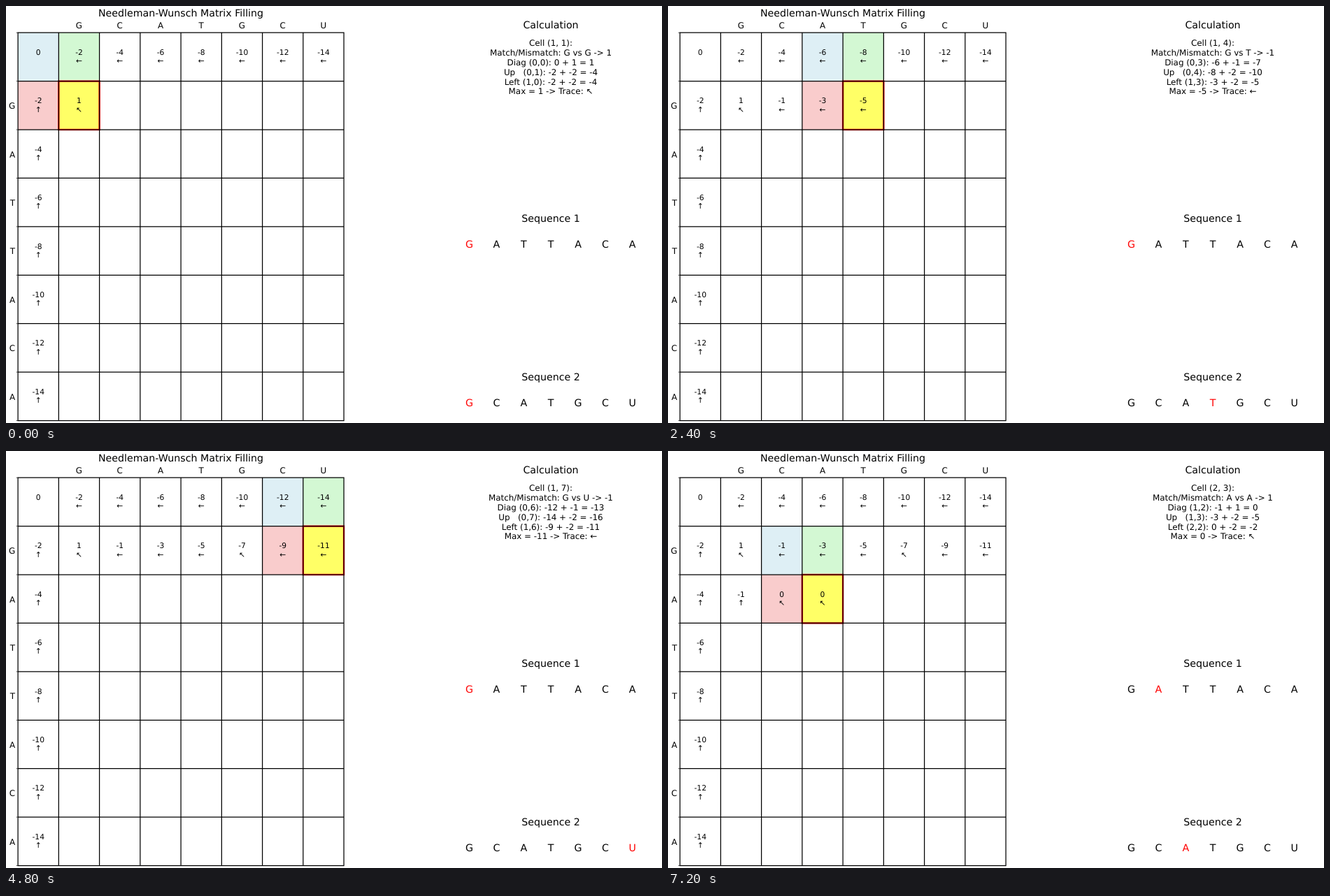
These frames come from a looping animation (938x597 px, 8 s). An HTML page:

```html
<!DOCTYPE html>
<html lang="en">
<head>
<meta charset="utf-8">
<title>Needleman-Wunsch Matrix Filling</title>
<style>
  html, body { margin: 0; width: 100%; height: 100%; overflow: hidden; background: #fff; }
  svg { display: block; }
  text {
    font-family: "DejaVu Sans", sans-serif;
    text-anchor: middle;
    text-rendering: geometricPrecision;
    white-space: pre;
  }
</style>
</head>
<body>
<svg id="stage" width="938" height="597" viewBox="0 0 938 597"></svg>
<script>
const STEP = 800, STEPS = 10;
const ROWS = "GATTACA", COLS = "GCATGCU", GAP = -2;
const X0 = 17.1, Y0 = 38.2, W = 58.25, H = 69.42, N = 8;
const BIG = 14.2, MID = 11.9, SMALL = 10.7;
const SIDE = 779;
const stage = document.getElementById("stage");

function add(tag, attrs, text) {
  const el = document.createElementNS("http://www.w3.org/2000/svg", tag);
  for (const k in attrs) el.setAttribute(k, attrs[k]);
  if (text !== undefined) el.textContent = text;
  return stage.appendChild(el);
}
const label = (x, y, size, text = "") => add("text", { x, y, "font-size": size }, text);
const colX = c => X0 + c * W;
const rowY = r => Y0 + r * H;
const tile = attrs => add("rect", { width: W, height: H, ...attrs });
function place(el, r, c) {
  el.setAttribute("x", colX(c));
  el.setAttribute("y", rowY(r));
}

// Score table
const score = [], trace = [];
function solve(r, c) {
  const match = ROWS[r - 1] === COLS[c - 1] ? 1 : -1;
  const diag = score[r - 1][c - 1] + match;
  const up = score[r - 1][c] + GAP;
  const left = score[r][c - 1] + GAP;
  const max = Math.max(diag, up, left);
  return { match, diag, up, left, max, arrow: max === diag ? "↖" : max === up ? "↑" : "←" };
}
for (let r = 0; r < N; r++) {
  score[r] = [];
  trace[r] = [];
  for (let c = 0; c < N; c++) {
    if (r && c) {
      const s = solve(r, c);
      score[r][c] = s.max;
      trace[r][c] = s.arrow;
    } else {
      score[r][c] = (r + c) * GAP;
      trace[r][c] = r ? "↑" : c ? "←" : "";
    }
  }
}

// Highlights lie under the grid
const diagTile = tile({ fill: "#deeff5" });
const upTile = tile({ fill: "#d3f8d3" });
const leftTile = tile({ fill: "#f9cccc" });
const current = tile({ fill: "#ffff66", stroke: "#f00", "stroke-width": 2.4 });

let grid = "", ticks = "";
for (let i = 0; i <= N; i++) {
  grid += `M${colX(i)} ${Y0}V${rowY(N)}M${X0} ${rowY(i)}H${colX(N)}`;
  ticks += `M${X0 - 2.4} ${rowY(i)}H${X0}`;
}
add("path", { d: grid, fill: "none", stroke: "#000", "stroke-width": 1.25, "stroke-linecap": "square" });
add("path", { d: ticks, fill: "none", stroke: "#000", "stroke-width": 0.7 });

label(250, 15, BIG, "Needleman-Wunsch Matrix Filling");
[...COLS].forEach((ch, i) => label(colX(i + 1.5), 31.8, MID, ch));
[...ROWS].forEach((ch, i) =>
  label(13.1, rowY(i + 1) + 39.6, MID, ch).style.textAnchor = "end");

const cells = [];
for (let r = 0; r < N; r++) {
  for (let c = 0; c < N; c++) {
    const x = colX(c + 0.5), y = rowY(r) + 31.7;
    const parts = [label(x, y, SMALL, score[r][c]), label(x, y + 12.2, SMALL, trace[r][c])];
    cells.push({ parts, order: r && c ? (r - 1) * 7 + c - 1 : -1 });
  }
}

label(SIDE, 31.6, BIG, "Calculation");
const lines = Array.from({ length: 6 }, (_, i) => label(SIDE, 57.4 + i * 13.78, MID));

function sequence(title, y, letters) {
  label(SIDE, y, BIG, title);
  return [...letters].map((ch, i) => label(662.6 + i * 38.85, y + 36.7, BIG, ch));
}
const seq1 = sequence("Sequence 1", 309.2, ROWS);
const seq2 = sequence("Sequence 2", 536.4, COLS);
const mark = (seq, at) => seq.forEach((el, i) => el.setAttribute("fill", i === at ? "#f00" : "#000"));

function draw(step) {
  const r = Math.floor(step / 7) + 1, c = step % 7 + 1;
  const s = solve(r, c);
  place(diagTile, r - 1, c - 1);
  place(upTile, r - 1, c);
  place(leftTile, r, c - 1);
  place(current, r, c);
  for (const { parts, order } of cells)
    for (const el of parts) el.setAttribute("visibility", order <= step ? "visible" : "hidden");
  [
    `Cell (${r}, ${c}):`,
    `Match/Mismatch: ${ROWS[r - 1]} vs ${COLS[c - 1]} -> ${s.match}`,
    `Diag (${r - 1},${c - 1}): ${score[r - 1][c - 1]} + ${s.match} = ${s.diag}`,
    `Up   (${r - 1},${c}): ${score[r - 1][c]} + ${GAP} = ${s.up}`,
    `Left (${r},${c - 1}): ${score[r][c - 1]} + ${GAP} = ${s.left}`,
    `Max = ${s.max} -> Trace: ${s.arrow}`
  ].forEach((text, i) => lines[i].textContent = text);
  mark(seq1, r - 1);
  mark(seq2, c - 1);
}

let shown = 0, start;
draw(0);
function tick(now) {
  start ??= now;
  const step = Math.floor((now - start) / STEP) % STEPS;
  if (step !== shown) draw(shown = step);
  requestAnimationFrame(tick);
}
requestAnimationFrame(tick);
</script>
</body>
</html>
```
